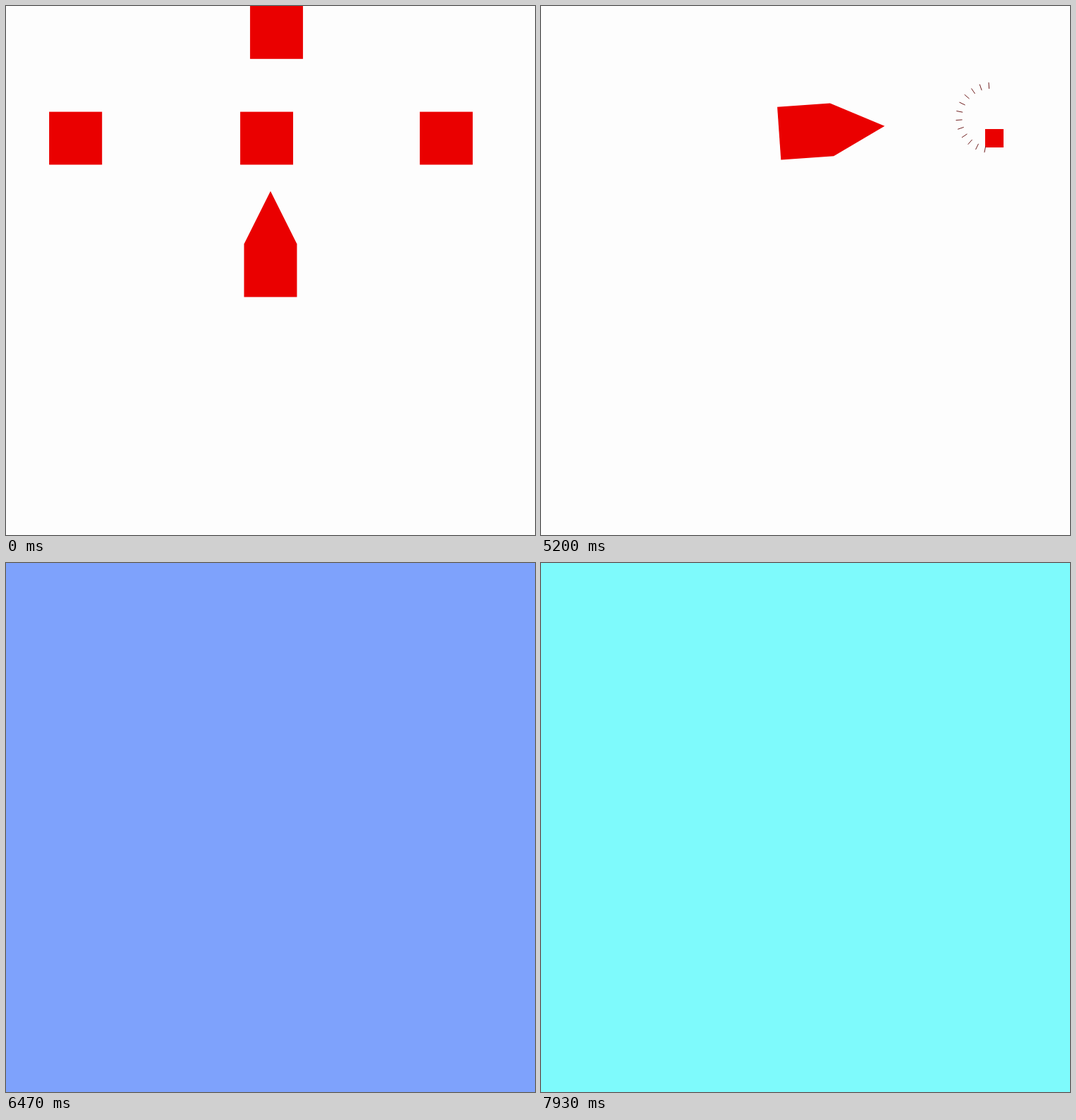
Animation of 748 by 748 pixels, one loop 8 s. Source, as an HTML page with a canvas:

```html
<!DOCTYPE html>
<html lang="en">
<head>
<meta charset="utf-8">
<title>Ship and squares</title>
<style>
  html, body { margin: 0; width: 100%; height: 100%; overflow: hidden; background: #fdfdfd; }
  canvas { display: block; }
</style>
</head>
<body>
<canvas id="stage" width="748" height="748"></canvas>
<script>
const ctx = document.getElementById('stage').getContext('2d');
const STAGE = 748, LOOP = 8000, STEP = 200 / 3;
const SIZE = STAGE / 10, HALF = SIZE / 2, ROW = STAGE / 4, CENTER = STAGE / 2;
const PARTY_START = 5400, SHRINK_TIME = 690, BULLET_SPEED = 0.3;
const RAD = Math.PI / 180;

// Each enemy sways around its column until it is hit.
const enemies = [
  { column: STAGE / 8, sway: 26, speed: 0.003, phase: 0.19, hit: 2950 },
  { column: CENTER, sway: 26, speed: 0.003, phase: -0.21, hit: 1250 },
  { column: STAGE * 7 / 8, sway: 32, speed: 0.00626, phase: -Math.PI / 2, hit: 4750 }
];

// Progress from 0 to 1 between two times.
const ramp = (t, start, end) => Math.min(1, Math.max(0, (t - start) / (end - start)));

function square(x, y, size = SIZE) {
  ctx.fillRect(x - size / 2, y - size / 2, size, size);
}

function drawShip(t) {
  const flight = ramp(t, 2900, 4350);
  const heading = -57 * ramp(t, 1750, 2400) + 143 * ramp(t, 3470, 4500);
  ctx.save();
  ctx.translate(CENTER - 38 * Math.sin(Math.PI * flight), CENTER - 196.5 * flight);
  ctx.rotate(heading * RAD);
  ctx.beginPath();
  ctx.moveTo(0, -3 * HALF);
  ctx.lineTo(HALF, -HALF);
  ctx.lineTo(HALF, HALF);
  ctx.lineTo(-HALF, HALF);
  ctx.lineTo(-HALF, -HALF);
  ctx.fill();
  ctx.restore();
}

function drawBurst(x, y, count) {
  ctx.strokeStyle = '#702020';
  ctx.beginPath();
  for (let i = 0; i < count; i++) {
    const a = (-94 - 15 * i) * RAD;
    ctx.moveTo(x + 41 * Math.cos(a), y + 41 * Math.sin(a));
    ctx.lineTo(x + 50 * Math.cos(a), y + 50 * Math.sin(a));
  }
  ctx.stroke();
}

function drawEnemy({ column, sway, speed, phase, hit }, t) {
  const age = t - hit;
  if (age >= SHRINK_TIME) return;
  const x = column + sway * Math.sin(speed * t + phase);
  square(x, ROW, SIZE * (1 - ramp(age, 0, SHRINK_TIME)));
  if (age > 0) drawBurst(x - 4.5, ROW - 29, Math.round(age / 37.5));
}

function draw(t) {
  const party = t >= PARTY_START;
  const hue = 136 + 0.2168 * (t - 6067);
  ctx.fillStyle = party ? `hsl(${hue}, 95%, 74%)` : '#fdfdfd';
  ctx.fillRect(0, 0, STAGE, STAGE);
  if (party) return;

  ctx.fillStyle = '#ea0000';
  square(382.5, HALF - BULLET_SPEED * t);
  if (t > 800 && t < 1250) square(CENTER, 330 - BULLET_SPEED * (t - 800));
  drawShip(t);
  for (const enemy of enemies) drawEnemy(enemy, t);
}

function frame() {
  const t = performance.now() % LOOP;
  // The picture advances 15 times a second.
  draw(Math.floor((t + 4) / STEP) * STEP % LOOP);
  requestAnimationFrame(frame);
}
frame();
</script>
</body>
</html>
```
